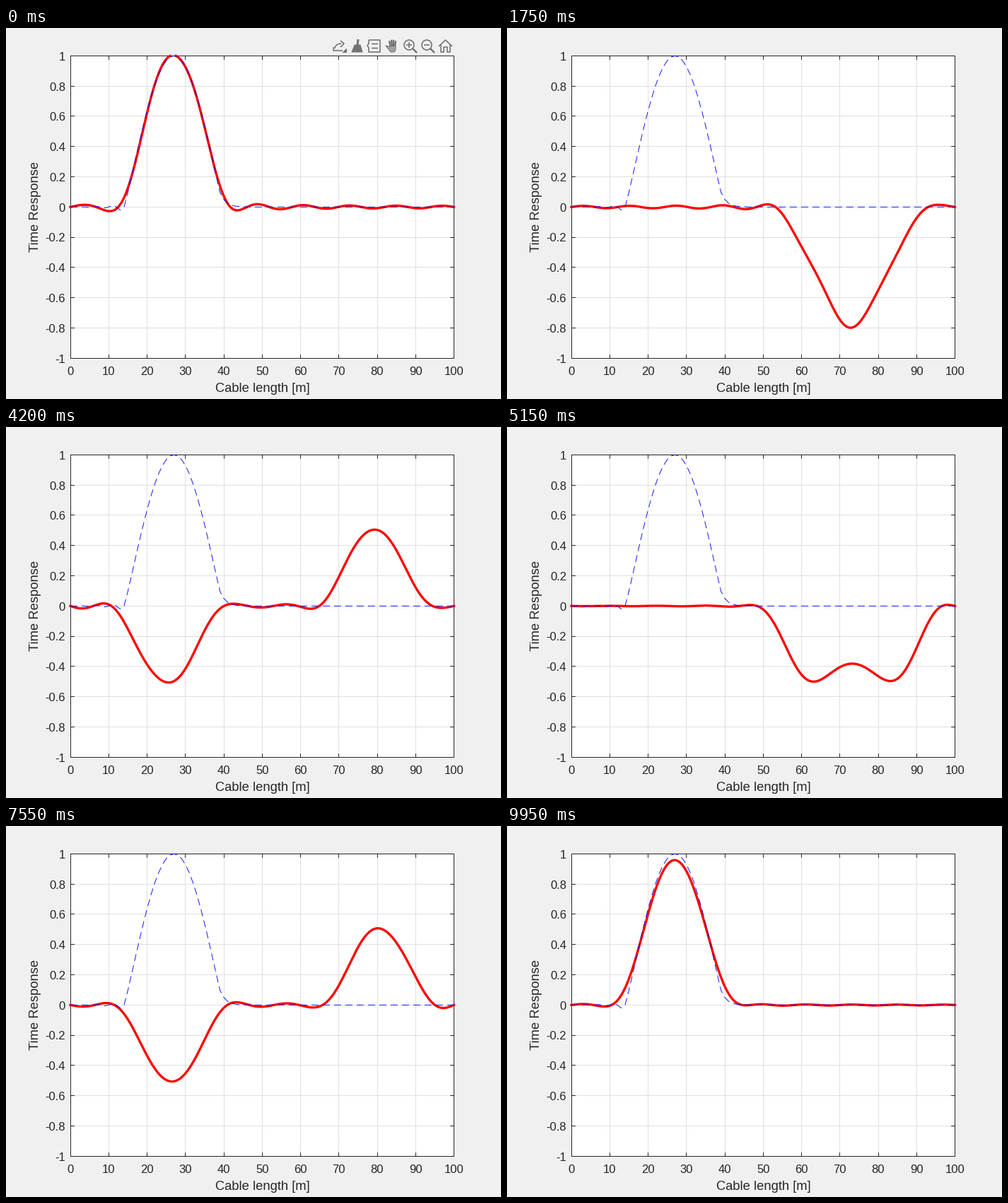
Write a matplotlib script that moves like this. It is 700 px wide and 525 px high and loops after 10000 ms.

```python
import math

import matplotlib.pyplot as plt
import numpy as np
from matplotlib.animation import FuncAnimation
from matplotlib.patches import Circle, Polygon, Rectangle

W, H = 700, 525
PT = 0.72                       # points per pixel at 100 dpi
FRAMES, INTERVAL = 200, 50
LENGTH = 100                    # cable length in metres
MODES = 16
STEP = 3.003                    # metres the wave travels per frame
CENTRE, HALF = 27, 13           # middle and half width of the pulse
INK, GRID, ICON, BACK = "#262626", "#dfdfdf", "#717171", "#f0f0f0"
LEFT, RIGHT = 0.13 * W, 0.905 * W
TOP, BOTTOM = 0.075 * H, 0.89 * H

plt.rcParams["font.family"] = "Liberation Sans"

fig = plt.figure(figsize=(W / 100, H / 100), dpi=100, facecolor=BACK)
ax = fig.add_axes([0, 0, 1, 1])
ax.set_xlim(0, W)
ax.set_ylim(H, 0)
ax.axis("off")


def to_x(metres):
    return LEFT + (RIGHT - LEFT) * np.asarray(metres) / LENGTH


def to_y(value):
    return (TOP + BOTTOM) / 2 - (BOTTOM - TOP) / 2 * np.asarray(value)


def mid(p):
    """Centre of the pixel that holds p."""
    return math.floor(p + 1e-6) + 0.5


def line(xs, ys, color=INK, width=1.0, z=2, **kw):
    kw.setdefault("solid_capstyle", "butt")
    return ax.plot(xs, ys, color=color, lw=width * PT, zorder=z,
                   clip_on=False, snap=False, **kw)[0]


def label(x, y, s, size, ha="center", **kw):
    ax.text(x, y, s, fontsize=size * PT, color=INK, ha=ha, va="baseline", **kw)


def draw_axes():
    x0, x1, y0, y1 = (mid(p) for p in (LEFT, RIGHT, TOP, BOTTOM))
    ax.add_patch(Rectangle((x0, y0), x1 - x0, y1 - y0, fc="white", ec="none",
                           zorder=0, snap=False))
    tick = 5.4
    for m in range(0, LENGTH + 1, 10):
        x = mid(to_x(m))
        line([x, x], [y0, y1], GRID, z=1)
        line([x, x], [y1, y1 - tick])
        line([x, x], [y0, y0 + tick])
        label(to_x(m), 491, str(m), 16.67)
    for k in range(-5, 6):
        y = mid(to_y(k / 5))
        line([x0, x1], [y, y], GRID, z=1)
        line([x0, x0 + tick], [y, y])
        line([x1, x1 - tick], [y, y])
        label(84, to_y(k / 5) + 6.4, f"{k / 5:g}", 16.67, ha="right")
    line([x0, x1, x1, x0, x0], [y0, y0, y1, y1, y0],
         solid_capstyle="projecting", solid_joinstyle="miter")
    label((LEFT + RIGHT) / 2 + 0.5, 515, "Cable length [m]", 18.33)
    label(46, (TOP + BOTTOM) / 2, "Time Response", 18.33, rotation=90,
          rotation_mode="anchor")


def draw_toolbar():
    """Seven icons, evenly spaced, each drawn around its own centre."""
    parts = []
    centres = iter(np.linspace(471, 621, 7))
    cy = 25

    def stroke(points, width=1.6):
        xs, ys = np.transpose(points)
        parts.append(line(cx + xs, cy + ys, ICON, width, z=5))

    def shape(points, fill=ICON):
        parts.append(ax.add_patch(Polygon(np.add(points, (cx, cy)), fc=fill,
                                          ec=ICON, lw=PT, zorder=5)))

    cx = next(centres)          # export
    bend = np.linspace(0, np.pi / 2, 8)
    stroke(np.column_stack([3 - 9 * np.cos(bend), 4 - 7 * np.sin(bend)]))
    stroke([(2, -7), (7, -3), (2, 2)])
    stroke([(-8, 2), (-8, 7), (5, 7)])
    shape([(10, 4), (10, 9), (5, 9)])

    cx = next(centres)          # brush
    stroke([(2, -9), (1, -1)], 3)
    shape([(-3, -1), (5, -1), (8, 9), (-7, 9)])
    stroke([(-4, 2.5), (6, 2.5)], 1)

    cx = next(centres)          # data tip
    stroke([(-8, -8), (8, -8), (8, 9), (-8, 9), (-8, 3), (-10, 0), (-8, -3), (-8, -8)])
    for y in (-2.5, 3.5):
        stroke([(-4, y), (5, y)])

    cx = next(centres)          # hand
    for k in range(4):
        stroke([(3 * k - 4, abs(k - 1.5) * 1.5 - 9), (2 * k - 2, 2)], 2.4)
    shape([(-9, 0), (-4, 1), (5, 0), (5, 6), (3, 9), (-2, 9)], "#a0a0a0")

    for bars in (2, 1):         # zoom in, zoom out
        cx = next(centres)
        parts.append(ax.add_patch(Circle((cx - 1, cy - 1), 7, fc="none", ec=ICON,
                                         lw=1.6 * PT, zorder=5)))
        stroke([(4, 4), (10, 10)], 2.4)
        stroke([(-5, -1), (3, -1)])
        if bars == 2:
            stroke([(-1, -5), (-1, 3)])

    cx = next(centres)          # home
    stroke([(-9, 1), (0.5, -8), (10, 1)])
    stroke([(-6, -1), (-6, 9), (-2, 9), (-2, 2), (3, 2), (3, 9), (7, 9), (7, -1)])
    return parts


def pulse(x):
    """Cosine bump with a small ripple before it and a short tail after it."""
    offset = np.clip((x - CENTRE) / HALF, -1, 1)
    bump = np.abs(np.cos(np.pi / 2 * offset)) ** 1.1
    before = CENTRE - HALF - 1 - x
    after = x - CENTRE - HALF
    ripple = -0.02 * np.exp(-np.abs(before) / 3) * np.cos(np.pi / 2 * before)
    tail = 0.05 * np.exp(-np.abs(after) / 1.4)
    return bump + ripple * (before >= 0) + tail * (after >= 0)


n = np.arange(1, MODES + 1)
wave_number = n * np.pi / LENGTH
grid = np.arange(LENGTH + 1)
start = pulse(grid)
coef = 2 / LENGTH * np.sin(np.outer(wave_number, grid)) @ start
metres = np.linspace(0, LENGTH, 1001)
shapes = coef[:, None] * np.sin(np.outer(wave_number, metres))

draw_axes()
toolbar = draw_toolbar()
wave = line(to_x(metres), to_y(0 * metres), "#ff0000", 3.33, z=3,
            solid_capstyle="projecting", solid_joinstyle="round")
line(to_x(grid), to_y(start), "#0000ff", 0.9, z=4, dash_capstyle="butt",
     linestyle=(0, (10 / 0.9, 6 / 0.9)))


def update(i):
    value = np.cos(wave_number * STEP * i) @ shapes
    wave.set_ydata(to_y(np.where(np.abs(value) <= 1, value, np.nan)))
    for part in toolbar:
        part.set_visible(i == 0)
    return [wave, *toolbar]


anim = FuncAnimation(fig, update, frames=FRAMES, interval=INTERVAL,
                     repeat=True, repeat_delay=0)
plt.show()
```
